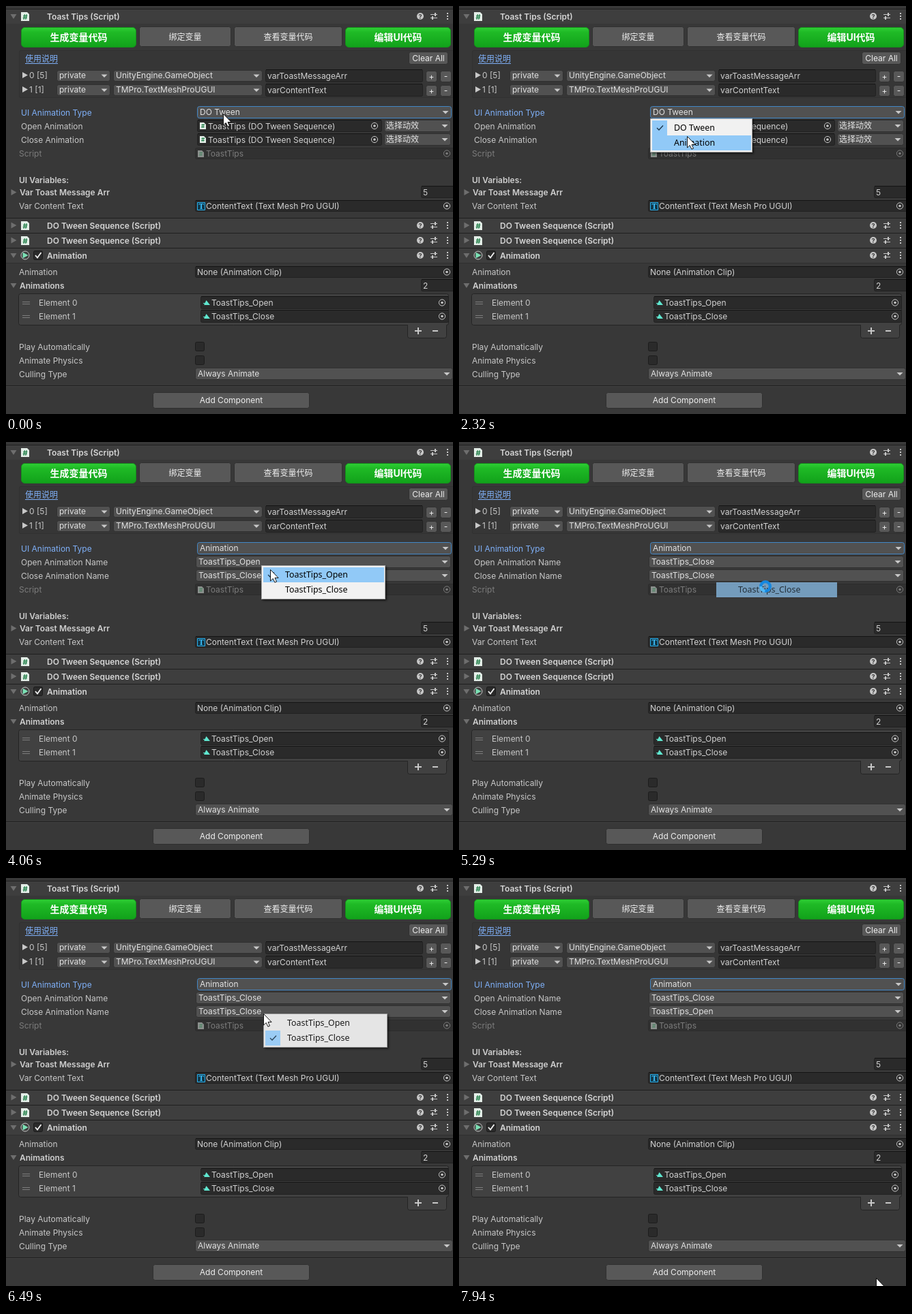
These frames come from a looping animation (655 px wide and 599 px high, 8 s). An HTML page with a canvas:

```html
<!DOCTYPE html>
<html lang="en">
<head>
<meta charset="utf-8">
<title>Inspector</title>
<style>
html, body { margin: 0; width: 100%; height: 100%; overflow: hidden; background: #383838; }
canvas { display: block; }
</style>
</head>
<body>
<canvas id="stage" width="655" height="599"></canvas>
<script>
const LOOP = 8000;
const c = document.getElementById('stage').getContext('2d');

const UI = '12px Inter, "Noto Sans CJK SC", "Noto Sans CJK", sans-serif';
const BOLD = '600 ' + UI;
const BIG = '700 14px Inter, "Noto Sans CJK SC", "Noto Sans CJK", sans-serif';
const MENU = '12.4px "Noto Sans", sans-serif';
const INK = '#c8c8c8', LIGHT = '#e2e2e2', DIM = '#7c7c7c', EDGE = '#242424';

// Cursor positions, each held until the next: [time, x, y]
const PATH = [
  [0, 318, 158], [810, 317, 156],
  [2170, 321, 168], [2230, 327, 181], [2320, 334, 191], [2380, 338, 197],
  [2750, 340, 203], [3160, 342, 206], [3220, 346, 205], [3310, 353, 199],
  [3370, 361, 192], [3430, 368, 186], [3490, 373, 182], [3550, 374, 181],
  [4060, 387, 187], [4120, 402, 193], [4210, 424, 202], [4270, 440, 208], [4390, 449, 212],
  [5560, 440, 205], [5650, 415, 190], [5710, 396, 181], [5800, 381, 177], [5890, 377, 176],
  [6100, 377, 180], [6190, 377, 190], [6280, 377, 199],
  [6640, 385, 203], [6700, 398, 205], [6760, 412, 206], [6850, 424, 206], [6910, 430, 206],
  [7510, 440, 222], [7570, 466, 275], [7660, 505, 360], [7720, 548, 445],
  [7780, 585, 520], [7850, 603, 565], [7940, 611, 587]
];

// fade: [time, opacity] while opening; after close only the picked row lingers
const CLIPS = ['ToastTips_Open', 'ToastTips_Close'];
const MENUS = [
  { x: 280, y: 165, w: 150, items: ['DO Tween', 'Animation'], checked: 0, pick: 1,
    fade: [[1680, .25], [1770, .8], [1830, 1]], close: 2890, rest: [[2890, .65], [2950, .25], [3010, .1], [3100, 0]] },
  { x: 374, y: 181, w: 182, items: CLIPS, checked: 0, pick: 1,
    fade: [[3790, .6], [3850, 1]], close: 5290, rest: [[5290, .7], [5350, .4], [5440, .15], [5500, 0]] },
  { x: 377, y: 199, w: 182, items: CLIPS, checked: 1, pick: 0,
    fade: [[6430, .4], [6490, .88], [6550, 1]], close: 7060, rest: [[7060, .7], [7120, .4], [7210, .15], [7270, 0]] }
];
const BUSY = [[5290, 5560], [7060, 7330]];

const at = (steps, t) => steps.filter(s => s[0] <= t).pop();

function rect(x, y, w, h, fill) {
  c.fillStyle = fill;
  c.fillRect(x, y, w, h);
}

function box(x, y, w, h, fill, edge, r = 2) {
  c.beginPath();
  c.roundRect(x + .5, y + .5, w - 1, h - 1, r);
  c.fillStyle = fill;
  c.fill();
  c.strokeStyle = edge;
  c.lineWidth = 1;
  c.stroke();
}

function text(s, x, y, color = INK, font = UI, align = 'left') {
  c.font = font;
  c.fillStyle = color;
  c.textAlign = align;
  c.fillText(s, x, y);
}

function poly(points, fill) {
  c.beginPath();
  points.forEach(([x, y]) => c.lineTo(x, y));
  c.closePath();
  c.fillStyle = fill;
  c.fill();
}

function line(points, color, width = 1) {
  c.beginPath();
  points.forEach(([x, y]) => c.lineTo(x, y));
  c.strokeStyle = color;
  c.lineWidth = width;
  c.stroke();
}

function disc(x, y, r, fill) {
  c.beginPath();
  c.arc(x, y, r, 0, Math.PI * 2);
  c.fillStyle = fill;
  c.fill();
}

function ring(x, y, r, color, width = 1) {
  c.beginPath();
  c.arc(x, y, r, 0, Math.PI * 2);
  c.strokeStyle = color;
  c.lineWidth = width;
  c.stroke();
}

const down = (x, y, color = INK) => poly([[x - 4.5, y - 2], [x + 4.5, y - 2], [x, y + 2.5]], color);
const right = (x, y, color) => poly([[x - 3.5, y - 4.5], [x + 4.5, y], [x - 3.5, y + 4.5]], color);
const fold = (x, y) => poly([[x - 4.5, y - 3], [x + 4.5, y - 3], [x, y + 4]], '#6e6e6e');

function target(x, y, color = INK) {
  ring(x, y, 4.6, color);
  disc(x, y, 1.8, color);
}

function popup(x, y, w, h, label, tx, base, edge = '#303030') {
  box(x, y, w, h, '#515151', edge, 3);
  text(label, tx, base, LIGHT);
  down(x + w - 9, y + h / 2);
}

function field(x, y, w, h, label, tx, base) {
  box(x, y, w, h, '#2a2a2a', '#212121');
  rect(x + 1, y, w - 2, 1, '#141414');
  text(label, tx, base, '#d2d2d2');
}

function button(x, y, w, h, label, base) {
  box(x, y, w, h, '#585858', '#303030', 3);
  text(label, x + w / 2, base, '#eeeeee', UI, 'center');
}

function green(x, y, w, h, label, base) {
  const g = c.createLinearGradient(0, y, 0, y + h);
  g.addColorStop(0, '#30d036');
  g.addColorStop(.25, '#1fba26');
  g.addColorStop(1, '#11a11a');
  box(x, y, w, h, g, '#168c1c', 5);
  text(label, x + w / 2, base, '#ffffff', BIG, 'center');
}

function script(x, y, size) {
  poly([[x, y], [x + size - 3, y], [x + size, y + 3], [x + size, y + size + 1], [x, y + size + 1]], '#e4eee8');
  text('#', x + size / 2, y + size - 1, '#1d7d45', `700 ${size - 1}px Inter, sans-serif`, 'center');
}

function header(y, title, open) {
  rect(0, y, 655, 1, '#1f1f1f');
  rect(0, y + 1, 655, 21, '#3e3e3e');
  const m = y + 11;
  if (open) fold(11, m); else right(11, m, '#6e6e6e');
  text(title, 60, m + 5, '#d6d6d6', BOLD);
  disc(607, m, 5, INK);
  text('?', 607, m + 3.5, '#3a3a3a', '700 9px Inter, sans-serif', 'center');
  for (const [dy, k] of [[-2.5, 629], [2.5, 625]]) {
    line([[622, m + dy], [632, m + dy]], INK);
    line([[k, m + dy - 2.5], [k, m + dy + 2.5]], INK, 2);
  }
  for (const d of [-4, 0, 4]) rect(646, m + d - 1, 2, 2, INK);
}

function varRow(y, label, type, name) {
  right(27.5, y + 8.5, INK);
  text(label, 34, y + 13);
  popup(74, y + 1, 79, 17, 'private', 78, y + 13);
  popup(157, y + 1, 219, 17, type, 161, y + 13);
  field(380, y, 231, 19, name, 383, y + 14);
  button(615, y + 2, 17, 17, '+', y + 15);
  button(636, y + 2, 17, 17, '-', y + 14);
}

function topPart() {
  rect(0, 0, 655, 599, '#383838');
  header(4, 'Toast Tips (Script)', true);
  script(22, 9, 12);
  green(22, 31, 169, 30, '生成变量代码', 51);
  button(195, 30, 135, 30, '绑定变量', 50);
  button(334, 30, 159, 30, '查看变量代码', 50);
  green(497, 31, 155, 30, '编辑UI代码', 51);

  box(19, 65, 640, 70, '#363636', '#313131');
  text('使用说明', 28, 82, '#7fb0f8');
  rect(28, 84, 48, 1, '#7fb0f8');
  button(590, 67, 58, 19, 'Clear All', 81);
  varRow(93, '0 [5]', 'UnityEngine.GameObject', 'varToastMessageArr');
  varRow(114, '1 [1]', 'TMPro.TextMeshProUGUI', 'varContentText');
}

function lowerPart() {
  text('Script', 19, 221, DIM);
  box(277, 208, 382, 17, '#313131', '#2c2c2c');
  c.globalAlpha = .5;
  script(281, 212, 9);
  c.globalAlpha = 1;
  text('ToastTips', 293, 221, DIM);
  target(646, 216.5, DIM);

  text('UI Variables:', 19, 260, '#d0d0d0', BOLD);
  right(11, 273.5, '#6e6e6e');
  text('Var Toast Message Arr', 20, 278, '#d0d0d0', BOLD);
  field(608, 264, 52, 18, '5', 611, 278);
  text('Var Content Text', 19, 298);
  field(277, 285, 382, 17, 'ContentText (Text Mesh Pro UGUI)', 293, 298);
  box(280, 288, 12, 12, '#12384a', '#27b3f2', 0);
  text('T', 286, 298, '#3cc2ff', '700 11px "Noto Serif", serif', 'center');
  target(646, 293.5);

  for (const y of [311, 333]) {
    header(y, 'DO Tween Sequence (Script)', false);
    script(22, y + 5, 12);
  }
  header(355, 'Animation', true);
  rect(0, 377, 655, 1, '#303030');
  ring(28, 366, 6, INK);
  right(28, 366, '#7be0b4');
  box(40, 359, 14, 14, '#2a2a2a', '#1a1a1a');
  line([[43, 366], [46, 369.5], [51.5, 362]], '#f0f0f0', 1.8);

  text('Animation', 19, 395);
  field(277, 382, 382, 17, 'None (Animation Clip)', 280, 395);
  target(646, 390.5);
  fold(11, 410);
  text('Animations', 20, 415, '#d0d0d0', BOLD);
  field(608, 401, 52, 18, '2', 611, 415);

  box(588, 466, 58, 22, '#414141', EDGE, 3);
  box(18, 422, 631, 47, '#414141', EDGE, 3);
  rect(589, 468, 56, 1, '#414141');
  CLIPS.forEach((name, i) => {
    const y = 426 + i * 20;
    rect(24, y + 8, 11, 1, '#7d7d7d');
    rect(24, y + 11, 11, 1, '#7d7d7d');
    text('Element ' + i, 48, y + 14);
    field(285, y, 364, 19, name, 301, y + 14);
    poly([[290, y + 13], [293.5, y + 6], [299, y + 13]], '#5fe6cf');
    rect(289, y + 10, 4, 1, '#5fe6cf');
    target(639, y + 9.5);
  });
  rect(599, 476, 10, 2, INK);
  rect(603, 472, 2, 10, INK);
  rect(625, 476, 8, 2, INK);

  text('Play Automatically', 19, 505);
  text('Animate Physics', 19, 525);
  for (const y of [493, 513]) box(277, y, 14, 14, '#2a2a2a', '#1c1c1c');
  text('Culling Type', 19, 545);
  popup(277, 531, 378, 18, 'Always Animate', 281, 544);
  rect(0, 557, 655, 1, '#1f1f1f');
  rect(0, 558, 655, 1, '#414141');
  button(215, 567, 230, 24, 'Add Component', 583);
}

function typeRows(t) {
  const clips = t >= MENUS[0].close;
  text('UI Animation Type', 22, 161, '#7fb0f8');
  popup(280, 147, 373, 18, clips ? 'Animation' : 'DO Tween', 284, 160, '#4287c6');
  ['Open Animation', 'Close Animation'].forEach((label, i) => {
    const y = 167 + i * 20;
    text(label + (clips ? ' Name' : ''), 22, y + 14);
    if (clips) {
      const m = MENUS[i + 1];
      popup(278, y, 374, 18, CLIPS[t >= m.close ? m.pick : m.checked], 282, y + 13);
    } else {
      field(280, y, 271, 18, 'ToastTips (DO Tween Sequence)', 296, y + 14);
      script(284, y + 4, 9);
      target(540, y + 9);
      popup(554, y, 98, 18, '选择动效', 557, y + 13);
    }
  });
}

function menuRow(m, i, hover) {
  const x = m.x + 3, y = m.y + 3 + i * 22;
  if (hover) rect(x, y, m.w - 5, 22, '#91c9f7');
  if (m.checked === i) {
    if (!hover) rect(x, y, 22, 22, '#91c9f7');
    line([[x + 7, y + 11], [x + 10, y + 14], [x + 16, y + 7.5]], '#1c3346', 1.3);
  }
  text(m.items[i], m.x + 35, y + 15, '#000000', MENU);
}

function drawMenu(m, t, px, py) {
  if (t < m.fade[0][0]) return;
  if (t >= m.close) {
    c.globalAlpha = at(m.rest, t)[1];
    if (c.globalAlpha) menuRow({ ...m, checked: -1 }, m.pick, true);
  } else {
    c.globalAlpha = at(m.fade, t)[1];
    c.shadowColor = 'rgba(0,0,0,.55)';
    c.shadowBlur = 3;
    c.shadowOffsetX = c.shadowOffsetY = 2;
    rect(m.x, m.y, m.w, 50, '#a6a6a6');
    c.shadowColor = 'transparent';
    rect(m.x + 1, m.y + 1, m.w - 2, 48, '#f1f1f1');
    const inside = px >= m.x + 3 && py >= m.y + 3;
    const over = inside ? Math.floor((py - m.y - 3) / 22) : -1;
    m.items.forEach((_, i) => menuRow(m, i, i === over));
  }
  c.globalAlpha = 1;
}

function drawCursor(t, x, y) {
  if (BUSY.some(([a, b]) => t >= a && t < b)) {
    ring(x, y, 6.8, '#1487e0', 4.2);
    const a = t / 160;
    c.beginPath();
    c.arc(x, y, 6.8, a, a + 1.5);
    c.strokeStyle = '#52b9f5';
    c.stroke();
    return;
  }
  const shape = [[0, 0], [0, 16.5], [3.8, 13], [6.4, 18.7], [9, 17.6], [6.5, 12], [11.6, 12]]
    .map(([dx, dy]) => [x + dx + .5, y + dy + .5]);
  poly(shape, '#ffffff');
  line([...shape, shape[0]], '#000000', .9);
}

function draw(t) {
  const [, x, y] = at(PATH, t);
  topPart();
  typeRows(t);
  lowerPart();
  MENUS.forEach(m => drawMenu(m, t, x, y));
  drawCursor(t, x, y);
}

const start = performance.now();
function tick() {
  draw((performance.now() - start) % LOOP);
  requestAnimationFrame(tick);
}
tick();
</script>
</body>
</html>
```
